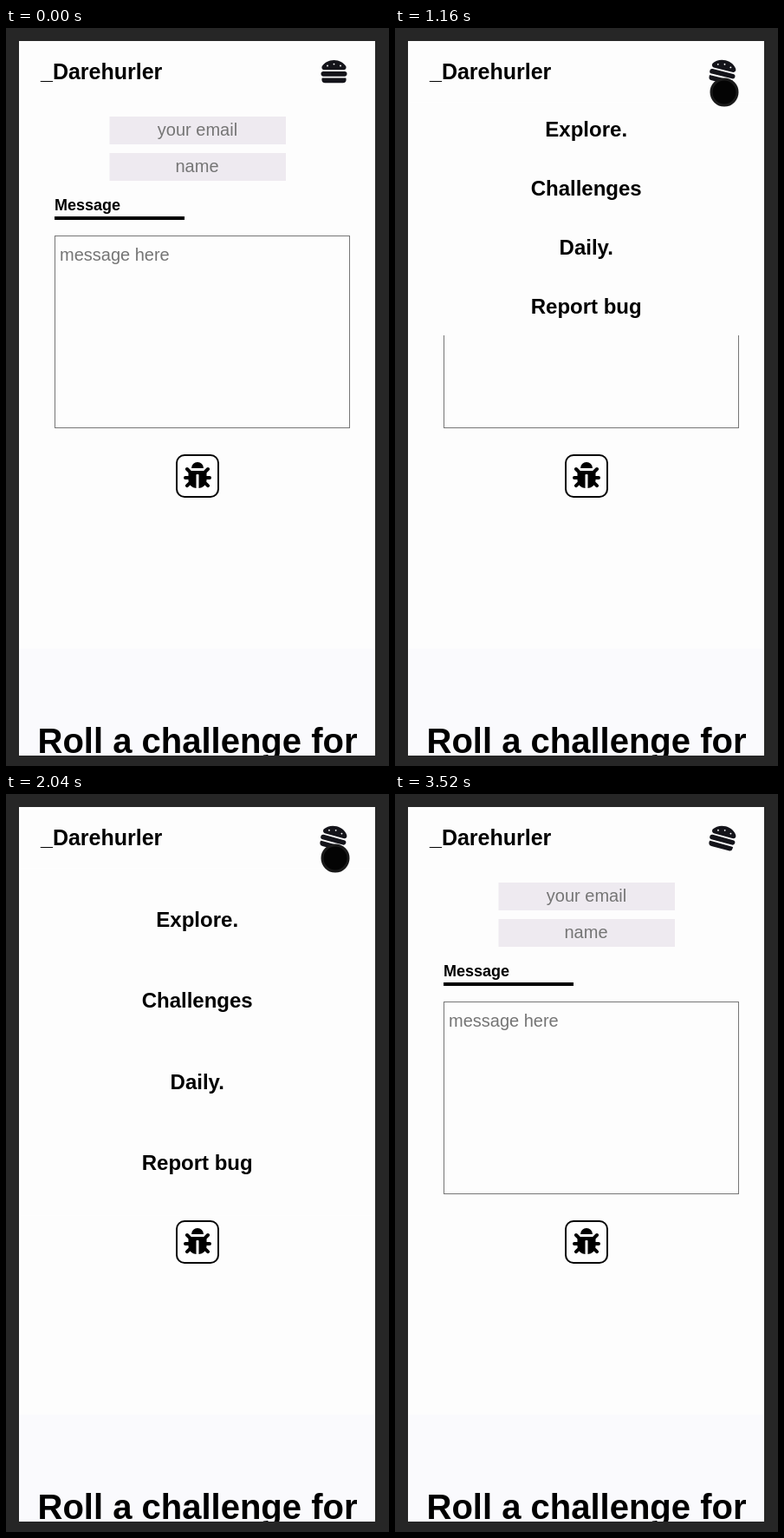
Write an HTML page that moves like this. It is 442x850 px and loops after 3.62 s.

```html
<!DOCTYPE html>
<html lang="en">
<head>
<meta charset="utf-8">
<title>Mobile menu</title>
<style>
  html, body { margin: 0; width: 100%; height: 100%; overflow: hidden; background: #262626; }
  svg { display: block; font-family: "Liberation Sans", Arial, sans-serif; }
  .bold { font-weight: bold; }
  .mid { text-anchor: middle; }
  .page { fill: #fdfdfd; }
  .frame { fill: #262626; }
  .field { font-size: 20px; fill: #757575; }
  #menu text { font-size: 24px; }
</style>
</head>
<body>
<svg width="442" height="850" viewBox="0 0 442 850">
  <defs>
    <clipPath id="menuClip"><rect id="clipBox" x="15" y="85.5" width="411" height="0"/></clipPath>
  </defs>

  <rect class="frame" width="442" height="850"/>
  <rect class="page" x="15" y="15" width="411" height="823"/>
  <rect x="15" y="715" width="411" height="123" fill="#fafafd"/>

  <text class="bold" x="40" y="59" font-size="25">_Darehurler</text>

  <g id="burger" fill="#14141a">
    <path d="M59 224H453C488 224 508 180 488 148C448 83 360 32 256 32S64 83 24 148C4 180 24 224 59 224Z"/>
    <rect y="256" width="512" height="96" rx="48"/>
    <path d="M480 384H32a16 16 0 0 0-16 16v16a64 64 0 0 0 64 64h352a64 64 0 0 0 64-64v-16a16 16 0 0 0-16-16Z"/>
    <g class="page">
      <circle cx="128" cy="144" r="16"/><circle cx="256" cy="112" r="16"/><circle cx="384" cy="144" r="16"/>
    </g>
  </g>

  <g fill="#eeeaf0">
    <rect x="119.5" y="102" width="203.5" height="32"/>
    <rect x="119.5" y="144" width="203.5" height="32"/>
  </g>
  <g class="field">
    <text class="mid" x="221" y="124">your email</text>
    <text class="mid" x="220.5" y="166">name</text>
    <text x="62" y="268">message here</text>
  </g>
  <text class="bold" x="56" y="210" font-size="18">Message</text>
  <rect x="56" y="217" width="150" height="4"/>
  <rect x="56.5" y="239.5" width="340" height="221" fill="none" stroke="#767676"/>

  <rect x="197" y="492" width="48" height="48" rx="9" fill="#fff" stroke="#000" stroke-width="2"/>
  <g transform="translate(205 500) scale(.0625)">
    <path d="M144 112a112 112 0 0 1 224 0Z"/>
    <path d="M232 480A144 144 0 0 1 88 336V197L125 160H387L424 197V336A144 144 0 0 1 280 480V236q0-12-12-12h-24q-12 0-12 12Z"/>
    <path d="M32 288H110M64 128L130 194M64 435L130 369M480 288H402M448 128L382 194M448 435L382 369"
          fill="none" stroke="#000" stroke-width="64" stroke-linecap="round"/>
  </g>

  <text class="bold mid" x="221" y="835" font-size="40">Roll a challenge for</text>
  <rect class="frame" y="838" width="442" height="12"/>

  <g id="menu" class="bold mid" clip-path="url(#menuClip)">
    <rect class="page" x="15" y="85.5" width="411" height="400"/>
    <text x="220.7">Explore.</text>
    <text x="220.7">Challenges</text>
    <text x="220.7">Daily.</text>
    <text x="220.7">Report bug</text>
  </g>

  <circle id="pointer" r="15" fill="#040404" stroke="#1a1a1a" stroke-width="3"/>
</svg>
<script>
  const LOOP = 3620, OPEN_AT = 965, CLOSE_AT = 2190, DURATION = 500;
  const MENU_TOP = 85.5, MENU_HEIGHT = 400, ROW = 68;
  const byId = id => document.getElementById(id);
  const burger = byId('burger'), clipBox = byId('clipBox'), pointer = byId('pointer');
  const items = document.querySelectorAll('#menu text');

  // The CSS "ease" curve: cubic-bezier(.25, .1, .25, 1)
  const bezier = (u, a, b) => 3 * (1 - u) ** 2 * u * a + 3 * (1 - u) * u * u * b + u ** 3;
  function ease(x) {
    if (x <= 0) return 0;
    if (x >= 1) return 1;
    let low = 0, high = 1;
    for (let i = 0; i < 20; i++) {
      const mid = (low + high) / 2;
      if (bezier(mid, .25, .25) < x) low = mid; else high = mid;
    }
    return bezier(low, .1, 1);
  }
  const progress = (t, start, length = DURATION) => ease((t - start) / length);

  function drawMenu(t) {
    const height = MENU_HEIGHT * (progress(t, OPEN_AT) - progress(t, CLOSE_AT));
    clipBox.setAttribute('height', Math.max(0, height));
    // Rows are spaced evenly, and overflow from the centre when the panel is short
    const pitch = ROW + Math.max(0, (height - 4 * ROW) / 5);
    items.forEach((item, i) =>
      item.setAttribute('y', MENU_TOP + height / 2 + (i - 1.5) * pitch + 7.5));
  }

  function drawPointer(t) {
    const away = Math.max(0, 650 - t, t - 2600) / 231;
    const p = Math.min(away ** 3, 4);
    pointer.setAttribute('cx', 380 + 56 * p);
    pointer.setAttribute('cy', 74 + 266 * p);
  }

  function draw(now) {
    const t = now % LOOP;
    const angle = 15 * progress(t, OPEN_AT, 300);
    burger.setAttribute('transform',
      `translate(363.5 35) scale(${30 / 512}) rotate(${angle} 256 256)`);
    drawMenu(t);
    drawPointer(t);
    requestAnimationFrame(draw);
  }
  draw(0);
</script>
</body>
</html>
```
